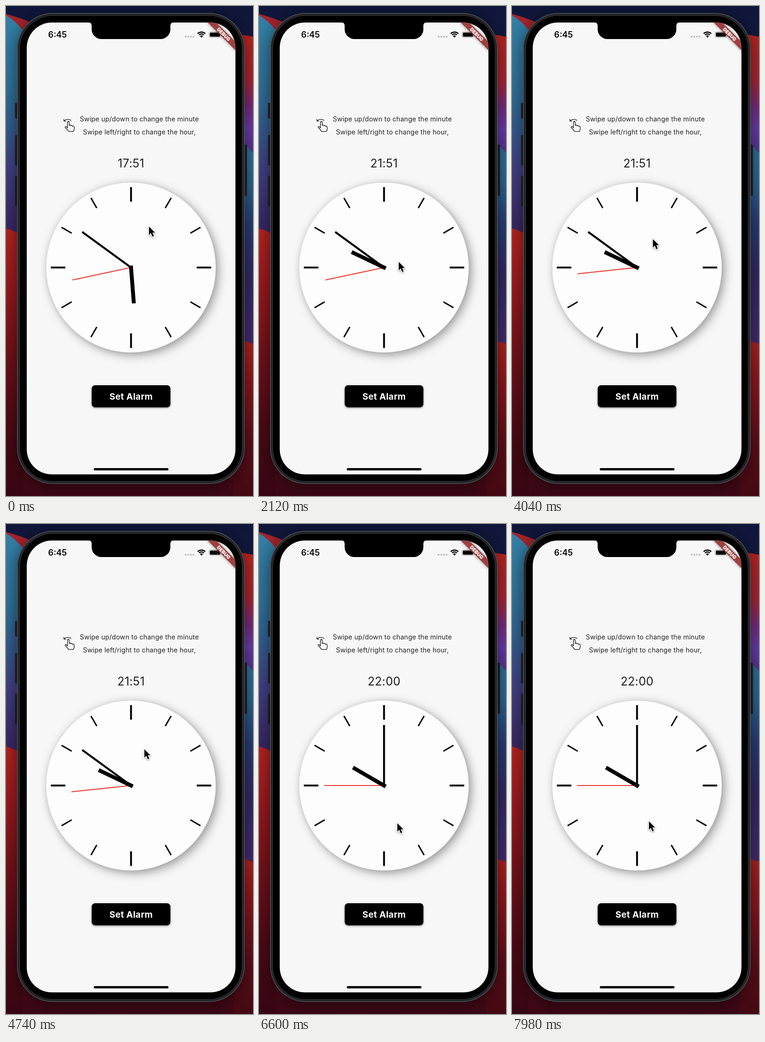
Recreate the animation shown at these times as an HTML page with a canvas. Size 532 by 1053 pixels, loop 8000 ms.

```html
<!DOCTYPE html>
<html lang="en">
<head>
<meta charset="utf-8">
<title>Alarm clock</title>
<style>
html, body { margin: 0; width: 100%; height: 100%; overflow: hidden; background: #10142e; }
canvas { display: block; width: 532px; height: 1053px; }
</style>
</head>
<body>
<canvas id="stage" width="532" height="1053"></canvas>
<script>
const W = 532, H = 1053, LOOP = 8000;
const FONT = 'Inter, Roboto, sans-serif';
const CLOCK = { x: 269.3, y: 562, r: 182.5 };
const stage = document.getElementById('stage').getContext('2d');
const backdrop = document.createElement('canvas');
backdrop.width = W;
backdrop.height = H;

// time, x, y of the pointer tip
const POINTER = [
  [0, 308, 474], [900, 201, 543.5], [1200, 201, 543.5], [2120, 301, 550],
  [2500, 320, 551.5], [3300, 320, 551.5], [4400, 298, 484], [4900, 298, 484],
  [6400, 298, 643], [7100, 298, 643], [7900, 295, 639], [8000, 295, 639]
];

const clamp = (v, lo, hi) => Math.min(hi, Math.max(lo, v));

function vertical(c, stops, y0 = 0, y1 = H) {
  const g = c.createLinearGradient(0, y0, 0, y1);
  for (const [y, color] of stops) g.addColorStop((y - y0) / (y1 - y0), color);
  return g;
}

function box(c, x, y, w, h, r, fill) {
  c.beginPath();
  c.roundRect(x, y, w, h, r);
  c.fillStyle = fill;
  c.fill();
}

function shape(c, path, fill) {
  c.fillStyle = fill;
  c.fill(new Path2D(path));
}

function shadow(c, color, blur, dx, dy) {
  c.shadowColor = color;
  c.shadowBlur = blur;
  c.shadowOffsetX = dx;
  c.shadowOffsetY = dy;
}

function label(c, text, x, y, size, weight, color, spacing = 0) {
  c.font = `${weight} ${size}px ${FONT}`;
  c.letterSpacing = spacing + 'px';
  c.textAlign = 'center';
  c.fillStyle = color;
  c.fillText(text, x, y);
}

// A stroke along a clock angle, from radius r0 to r1
function ray(c, deg, r0, r1, width, color) {
  const a = deg * Math.PI / 180, s = Math.sin(a), k = -Math.cos(a);
  c.beginPath();
  c.moveTo(CLOCK.x + s * r0, CLOCK.y + k * r0);
  c.lineTo(CLOCK.x + s * r1, CLOCK.y + k * r1);
  c.lineWidth = width;
  c.strokeStyle = color;
  c.stroke();
}

function drawWallpaper(c) {
  c.fillStyle = vertical(c, [[0, '#10163a'], [300, '#182048'], [1000, '#480a18'], [H, '#3c0714']]);
  c.fillRect(0, 0, W, H);

  shape(c, 'M0 17Q30 25 60 38V140H0Z', '#a3242b');
  shape(c, 'M0 20Q20 31 36 52V520H0Z', vertical(c,
    [[20, '#337fa6'], [170, '#2f7199'], [260, '#335b8d'], [350, '#413f82'], [490, '#37245f']], 20, 520));
  shape(c, 'M0 478Q16 482 36 494V1053H0Z', vertical(c,
    [[478, '#b3231f'], [600, '#98191f'], [740, '#731119'], [900, '#4d0a15'], [H, '#360612']], 478));

  shape(c, 'M490 60Q512 62 532 66V330H490Z', vertical(c,
    [[60, '#b5241f'], [160, '#a62432'], [215, '#752b7c'], [265, '#673ba8'], [310, '#553391']], 60, 330));
  shape(c, 'M490 280Q515 296 532 316V740H490Z', vertical(c,
    [[280, '#2d7298'], [380, '#2a6390'], [470, '#273c72'], [580, '#332861'], [740, '#462a70']], 280, 740));
  shape(c, 'M490 716Q512 718 532 726V1053H490Z', vertical(c,
    [[716, '#ae211f'], [800, '#8f171d'], [930, '#600e19'], [H, '#430914']], 716));
}

function drawBody(c) {
  c.save();
  shadow(c, 'rgba(0,0,0,.5)', 34, 0, 6);
  box(c, 24, 15, 490, 1012, 77, '#000');
  c.restore();
  for (const [y, h] of [[208, 34], [277, 66], [365, 66]]) box(c, 19.5, y, 8, h, 2, '#181920');
  box(c, 511, 298, 8, 110, 2, '#181920');
  box(c, 24, 15, 490, 1012, 77, '#5a5d60');
  box(c, 25.2, 16.2, 487.6, 1009.6, 76, '#222426');
  box(c, 29, 20, 480, 1002, 72, '#34363a');
  box(c, 30, 21, 478, 1000, 71, '#000');
}

function drawStatus(c) {
  label(c, '6:45', 111, 68, 18, 600, '#050505');
  for (let i = 0; i < 4; i++) box(c, 385 + i * 5.6, 64, 4, 4, 1, '#c6c6c6');

  c.save();
  c.strokeStyle = '#000';
  c.lineWidth = 2.5;
  for (const r of [11.6, 7.6]) {
    c.beginPath();
    c.arc(421, 67.5, r, -Math.PI * .75, -Math.PI * .25);
    c.stroke();
  }
  c.restore();
  shape(c, 'M421 68L417.7 64.6Q421 62 424.3 64.6Z', '#000');

  c.beginPath();
  c.roundRect(437.3, 55.2, 25.4, 12.4, 3.5);
  c.strokeStyle = '#999';
  c.lineWidth = 1;
  c.stroke();
  box(c, 439, 56.9, 22, 9, 2, '#000');
  box(c, 463.8, 59.4, 1.5, 4, 1, '#999');
}

function drawBanner(c) {
  c.save();
  c.translate(494.2, 35.6);
  c.rotate(Math.PI / 4);
  c.save();
  shadow(c, 'rgba(0,0,0,.5)', 6, 0, 0);
  c.fillStyle = '#7b7b7b';
  c.fillRect(-44, 29.4, 88, 12.6);
  c.restore();
  c.fillStyle = 'rgba(183,28,28,.627)';
  c.fillRect(-44, 29.4, 88, 12.6);
  label(c, 'DEBUG', 0, 39.5, 10.4, 900, '#fff');
  c.restore();
}

function drawHint(c) {
  c.save();
  c.strokeStyle = '#161616';
  c.lineWidth = 1.3;
  c.lineCap = c.lineJoin = 'round';
  c.stroke(new Path2D('M125 247Q131.5 241 140 245.6M124.6 243.4L124.9 247.4L129 247.6'));
  c.stroke(new Path2D('M132.4 262V250.2Q132.4 248 134.3 248Q136.2 248 136.2 250.2V257.2' +
    'Q136.4 255.5 138.2 255.6Q139.9 255.8 139.9 257.8Q140.4 256.5 141.8 256.6Q143.6 256.8 143.6 259' +
    'Q144.3 257.8 145.5 258.2Q147 258.7 147 260.8V263.5Q147 266.5 145 269.6H134.5' +
    'Q133.5 267 130.6 264.3L127.5 261Q127 259.4 128.5 258.8Q129.8 258.5 132.4 262'));
  c.restore();
  label(c, 'Swipe up/down to change the minute', 287.2, 248, 14.2, 400, '#222', .2);
  label(c, 'Swipe left/right to change the hour,', 287.2, 276, 14.2, 400, '#222', .2);
}

function drawDial(c) {
  c.save();
  c.beginPath();
  c.arc(CLOCK.x, CLOCK.y, CLOCK.r, 0, Math.PI * 2);
  c.fillStyle = '#fdfdfd';
  shadow(c, 'rgba(0,0,0,.13)', 14, 0, 0);
  c.fill();
  shadow(c, 'rgba(0,0,0,.31)', 20, 7, 7);
  c.fill();
  c.restore();
  for (let i = 0; i < 12; i++) {
    const main = i % 3 === 0;
    ray(c, i * 30, main ? 141.5 : 147.5, 172.7, main ? 4 : 3, '#000');
  }
}

function drawButton(c) {
  c.save();
  shadow(c, 'rgba(0,0,0,.4)', 4, 0, 1.5);
  box(c, 184.6, 814.9, 169.5, 47.6, 7.5, '#000');
  c.restore();
  label(c, 'Set Alarm', 269.5, 846, 19, 700, '#fff', .3);
}

function drawScreen(c) {
  c.save();
  c.beginPath();
  c.roundRect(44.7, 35.6, 449.5, 971, 54);
  c.clip();
  c.fillStyle = '#f7f7f7';
  c.fillRect(44, 35, 451, 972);
  drawStatus(c);
  drawHint(c);
  drawDial(c);
  drawButton(c);
  box(c, 189, 993, 161, 5, 2.5, '#000');
  drawBanner(c);
  c.restore();
  shape(c, 'M178 35Q184.5 35.6 184.5 43V50A21 21 0 0 0 205.5 71H333A21 21 0 0 0 354 50V43Q354 35.6 360.5 35Z', '#000');
}

function drawHands(c, h, m, s) {
  c.lineCap = 'square';
  ray(c, s * 6, 0, 128, 2.1, '#e8382e');
  ray(c, m * 6, 0, 128, 4.2, '#000');
  ray(c, (h + m / 60) * 30, 0, 73, 8.4, '#000');
  c.lineCap = 'butt';
}

function pointerAt(t) {
  let i = 1;
  while (i < POINTER.length - 1 && POINTER[i][0] < t) i++;
  const a = POINTER[i - 1], b = POINTER[i];
  const u = clamp((t - a[0]) / (b[0] - a[0]), 0, 1), e = u * u * (3 - 2 * u);
  return [a[1] + (b[1] - a[1]) * e, a[2] + (b[2] - a[2]) * e];
}

function drawPointer(c, x, y) {
  const arrow = new Path2D('M0 0V18L4.1 14.1L7.4 21.6L10.5 20.3L7.4 12.9H13Z');
  c.save();
  c.translate(x, y);
  c.lineJoin = 'round';
  c.lineWidth = 2.4;
  c.strokeStyle = '#fff';
  shadow(c, 'rgba(0,0,0,.4)', 4, 0, 1.5);
  c.stroke(arrow);
  shadow(c, 'transparent', 0, 0, 0);
  c.fillStyle = '#000';
  c.fill(arrow);
  c.restore();
}

function draw(t) {
  // the dragged time advances in whole hours, then whole minutes
  const hour = 17 + clamp(Math.floor((t - 1200) / 200), 0, 4);
  const minute = 51 + clamp(Math.floor((t - 5000) / 140), 0, 9);
  const second = 43 + (t >= 2300) + (t >= 5500);
  const total = hour * 60 + minute;
  const h = Math.floor(total / 60), m = total % 60;

  stage.drawImage(backdrop, 0, 0);
  label(stage, `${h}:${String(m).padStart(2, '0')}`, 269.4, 346.7, 25, 400, '#202020', .3);
  drawHands(stage, h, m, second);
  drawPointer(stage, ...pointerAt(t));
}

const back = backdrop.getContext('2d');
drawWallpaper(back);
drawBody(back);
drawScreen(back);

const start = performance.now();
function tick() {
  draw((performance.now() - start) % LOOP);
  requestAnimationFrame(tick);
}
tick();
</script>
</body>
</html>
```
